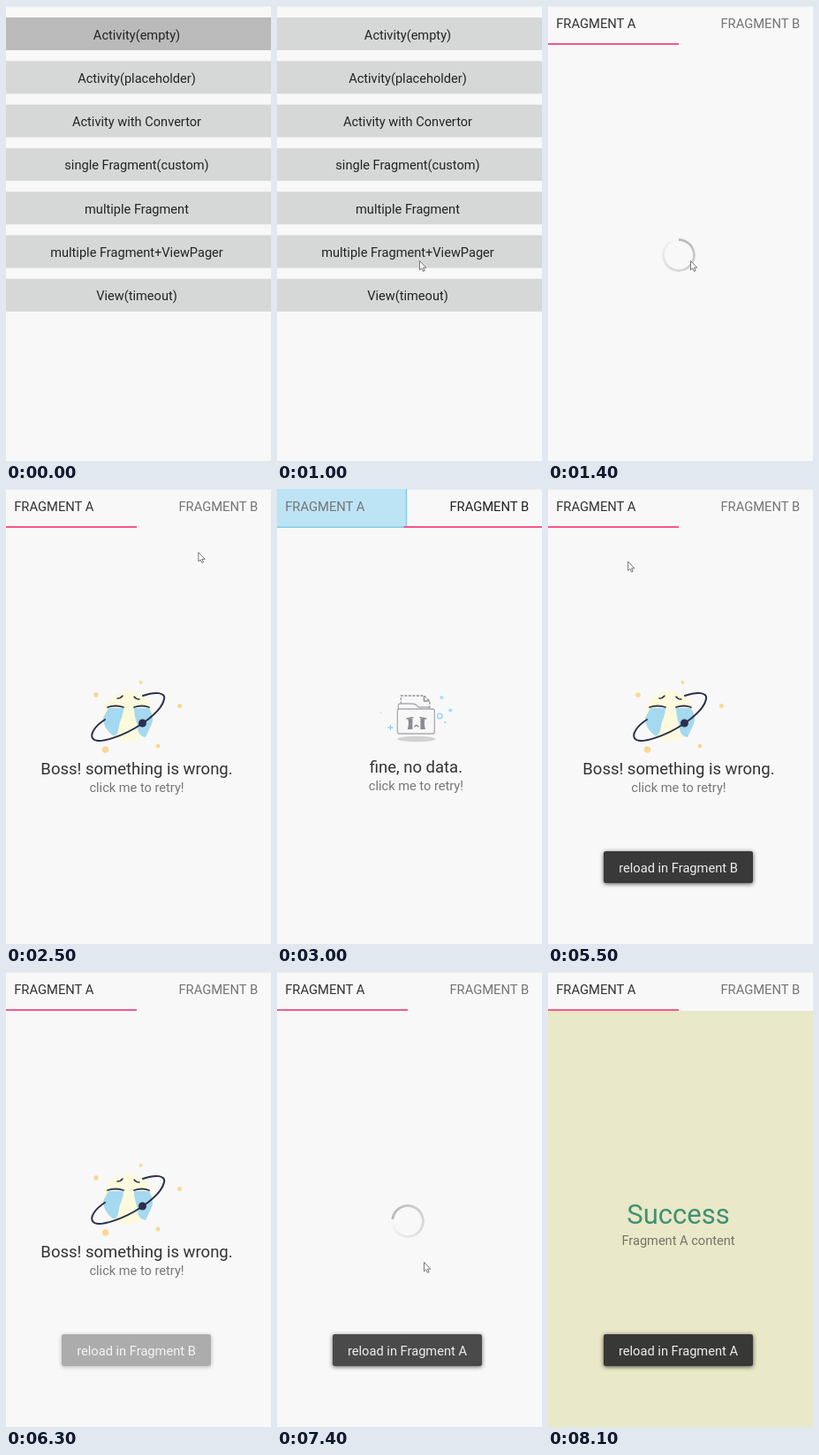
Animation of 300 by 515 pixels, one loop 9.1 s. Source, as an HTML page:

```html
<!DOCTYPE html>
<html lang="en">
<head>
<meta charset="utf-8">
<title>Page states demo</title>
<style>
html, body { margin: 0; width: 100%; height: 100%; overflow: hidden; background: #f8f8f8; }
#stage { position: relative; width: 300px; height: 515px; overflow: hidden; }
svg, .layer { position: absolute; left: 0; top: 0; width: 300px; height: 515px; }
.screen { background: linear-gradient(#ededed 1.5px, #f8f8f8 1.5px); }
text { font: 14.6px Roboto, "Open Sans", sans-serif; fill: #232323; }
.mid { text-anchor: middle; }
.title { font-size: 18.5px; fill: #333; }
.sub { fill: #777; }
.tab { font-size: 14.75px; }
.spin {
  position: absolute; left: 129px; top: 263px; width: 38px; height: 38px; border-radius: 50%;
  -webkit-mask: radial-gradient(closest-side, #0000 82%, #000 86%);
  mask: radial-gradient(closest-side, #0000 82%, #000 86%);
}
#toast {
  position: absolute; left: 63px; top: 410px; width: 169px; height: 36px; border-radius: 2px;
  background: #343434f8; box-shadow: 0 1px 5px #000a; color: #eee;
  font: 14.65px/38px Roboto, "Open Sans", sans-serif; text-align: center; white-space: nowrap;
}
</style>
</head>
<body>
<div id="stage">
  <svg id="menu" class="screen"></svg>

  <div id="pager" class="layer screen">
    <div id="pageA" class="layer">
      <svg id="wrong">
        <circle cx="138" cy="257" r="28.5" fill="#fdf9dd"/>
        <g fill="#a4d9ef">
          <path d="M116 248H133C133 257 129 261 128 268S126 280 121 279Q110 271 110 259Z"/>
          <path d="M145 248H162Q168 258 165 266L158 281Q150 280 149 271C148 262 145 258 145 248Z"/>
        </g>
        <g fill="none" stroke="#2c2f4c" stroke-linecap="round">
          <path stroke-width="1.8" d="M115 247Q124 244 133 247M145 247Q154 244 162 247"/>
          <path stroke-width="1.4" d="M126 237Q130 237 132 234M145 235Q147 238 151 238"/>
          <path stroke-width="2" d="M155 234C169 229 181 230 179 238C177 247 168 256 155 265C133 280 103 290 98 282C95 277 101 268 112 261"/>
        </g>
        <circle cx="154.5" cy="265" r="4.5" fill="#2c2f4c"/>
        <g fill="#f9d794">
          <circle cx="102" cy="233" r="2.7"/><circle cx="152.5" cy="219" r="2"/>
          <circle cx="196.5" cy="245.5" r="2.5"/><circle cx="112.5" cy="295" r="3.7"/>
          <circle cx="172" cy="291" r="2.4"/>
        </g>
        <text class="mid title" x="148" y="322.5">Boss! something is wrong.</text>
        <text class="mid sub" x="148" y="343">click me to retry!</text>
      </svg>
      <svg id="success">
        <path d="M0 44H300V515H0Z" fill="#e9e8c8"/>
        <text class="mid" x="147.5" y="284.5" style="font-size:31px;fill:#3f9271">Success</text>
        <text class="mid" x="147.5" y="308.5" style="fill:#747469">Fragment A content</text>
      </svg>
      <div class="spin" id="spinA"></div>
    </div>
    <div id="pageB" class="layer">
      <svg id="empty">
        <ellipse cx="148.5" cy="283" rx="21.5" ry="3.2" fill="#d2d2d2"/>
        <g fill="#f7f7f7" stroke="#abacb1" stroke-width="1.3" stroke-linejoin="round">
          <path d="M131 248V234H157L163.5 240V249" stroke="#909196" stroke-dasharray="3 1.5"/>
          <path d="M157 234V240H163" fill="none" stroke="#909196"/>
          <path d="M128 251V245Q128 243 130 243H143Q148 243 151 247H163V251Z"/>
          <rect x="127" y="249" width="42" height="28" rx="2"/>
        </g>
        <path d="M137 260L145 258.500M160 260L152 258.500M146 269.500Q148.500 265.500 151 269.500" fill="none" stroke="#8b8c92" stroke-width="1.3"/>
        <path d="M139 260H144V272H138.500Q140.500 266 139 260ZM153 260H158Q156.500 266 158.500 272H153Z" fill="#8b8c92"/>
        <g fill="none" stroke="#8fcef4" stroke-width="1.3">
          <circle cx="175" cy="257" r="2.8"/>
          <path d="M116 270H122M119 267V273M185 250.5H189M187 248.5V252.5"/>
        </g>
        <g fill="#a9dbf7">
          <circle cx="177" cy="236" r="2"/><circle cx="181" cy="264" r="1.3"/>
          <circle cx="108" cy="253" r="1" opacity=".6"/>
        </g>
        <text class="mid title" x="148" y="320.5">fine, no data.</text>
        <text class="mid sub" x="148" y="341.3">click me to retry!</text>
      </svg>
      <div class="spin" id="spinB"></div>
    </div>
    <svg>
      <g id="glow">
        <path d="M0 0H147V44H0Z" fill="#bde4f4"/>
        <path d="M0 43.2H146.5V0" fill="none" stroke="#85cbe8" stroke-width="1.4"/>
      </g>
      <text id="tabA" class="tab" x="9.2" y="25">FRAGMENT A</text>
      <text id="tabB" class="tab" x="195.4" y="25">FRAGMENT B</text>
      <rect id="bar" y="42" width="148" height="2" fill="#f8588c"/>
    </svg>
  </div>

  <div id="toast"></div>
  <svg>
    <path id="cursor" d="M0 .5V10.8L2.3 8.8L3.9 12.3L5.6 11.6L4 8.2H7.3Z" fill="#fff" stroke="#555" stroke-width=".8"/>
  </svg>
</div>

<script>
const LOOP = 9100, STEP = 100;
const OPEN = 1200, FAILED = 2100, TO_B = 2700, RETRY_B = 4100, TO_A = 5000, RETRY_A = 7100, DONE = 8100;
const $ = id => document.getElementById(id);

const within = (t, from, to) => t >= from && t < to;
const show = (id, on) => { $(id).style.display = on ? "" : "none"; };
const ramp = (t, start, length) => Math.min(1, Math.max(0, (t - start) / length));
const mix = (a, b, u) => a + (b - a) * u;
const glide = (t, start) => 1 - (1 - ramp(t, start, 600)) ** 5;
const fade = (t, start) => ramp(t, start, 330);

// Pointer trips between places, each followed by a rest
const row = [161.5, 288], tabA = [62, 16], tabB = [232, 17], retry = [168.5, 330];
const trips = [
  { start: 200, end: FAILED, from: [278, 244], to: row },
  { start: FAILED, end: TO_B + 200, from: row, to: tabB },
  { start: 3300, end: 4400, from: [238, 200], to: [171.5, 332] },
  { start: 4400, end: 5400, from: [171.5, 332], to: tabA },
  { start: 5400, end: 6000, from: tabA, to: [205, 344] },
  { start: 6400, end: 7500, from: [220, 311], to: [166.5, 328] },
  { start: 7500, end: 8000, from: [166.5, 328], to: [300, 300] }
];

const labels = ["Activity(empty)", "Activity(placeholder)", "Activity with Convertor",
  "single Fragment(custom)", "multiple Fragment", "multiple Fragment+ViewPager", "View(timeout)"];
$("menu").innerHTML = labels.map((label, i) => {
  const y = 13 + i * 49.3;
  return `<rect y="${y}" width="300" height="37" fill="#d6d7d7"/>` +
    `<text class="mid" x="148" y="${y + 24.5}">${label}</text>`;
}).join("");
const firstRow = $("menu").querySelector("rect");

function drawPager(t) {
  show("pager", t >= OPEN);
  $("pager").style.opacity = t < OPEN + STEP ? .5 : 1;

  const p = glide(t, TO_B) - glide(t, TO_A);
  $("pageA").style.transform = `translateX(${-300 * p}px)`;
  $("pageB").style.transform = `translateX(${300 * (1 - p)}px)`;
  $("bar").setAttribute("x", 148 * p);
  $("bar").setAttribute("width", mix(148, 158, p));
  $("tabA").style.fill = p < .5 ? "#333" : "#757575";
  $("tabB").style.fill = p < .5 ? "#757575" : "#232323";
  show("glow", within(t, TO_B + STEP, TO_B + 400) || within(t, TO_A - STEP, TO_A + STEP));
}

function drawStates(t) {
  show("wrong", within(t, FAILED, RETRY_A));
  show("success", t >= DONE);
  show("empty", t < RETRY_B);
  show("spinA", t < FAILED || within(t, RETRY_A, DONE));
  show("spinB", t >= RETRY_B);
  const begun = [RETRY_A, RETRY_B].find(s => t >= s) || OPEN + 2 * STEP;
  const ring = `conic-gradient(from ${-.28 * (t - begun)}deg, #b8b8b8, #b8b8b800)`;
  $("spinA").style.background = $("spinB").style.background = ring;
}

function drawToast(t) {
  const again = t >= RETRY_A;
  $("toast").textContent = "reload in Fragment " + (again ? "A" : "B");
  $("toast").style.opacity = again ? fade(t, RETRY_A) : fade(t, RETRY_B) - fade(t, 6100);
}

function drawCursor(t) {
  const trip = trips.find(k => within(t, k.start, k.end));
  show("cursor", trip);
  if (!trip) return;
  const u = ramp(t, trip.start, 500);
  const [x, y] = trip.from.map((a, i) => mix(a, trip.to[i], u));
  $("cursor").setAttribute("transform", `translate(${x} ${y})`);
}

function draw(time) {
  const t = Math.floor(time / STEP) * STEP;
  firstRow.setAttribute("fill", t < 1000 ? "#bababa" : "#d6d7d7");
  drawPager(t);
  drawStates(t);
  drawToast(t);
  drawCursor(t);
}

const start = performance.now();
function tick() {
  draw((performance.now() - start) % LOOP);
  requestAnimationFrame(tick);
}
tick();
</script>
</body>
</html>
```
